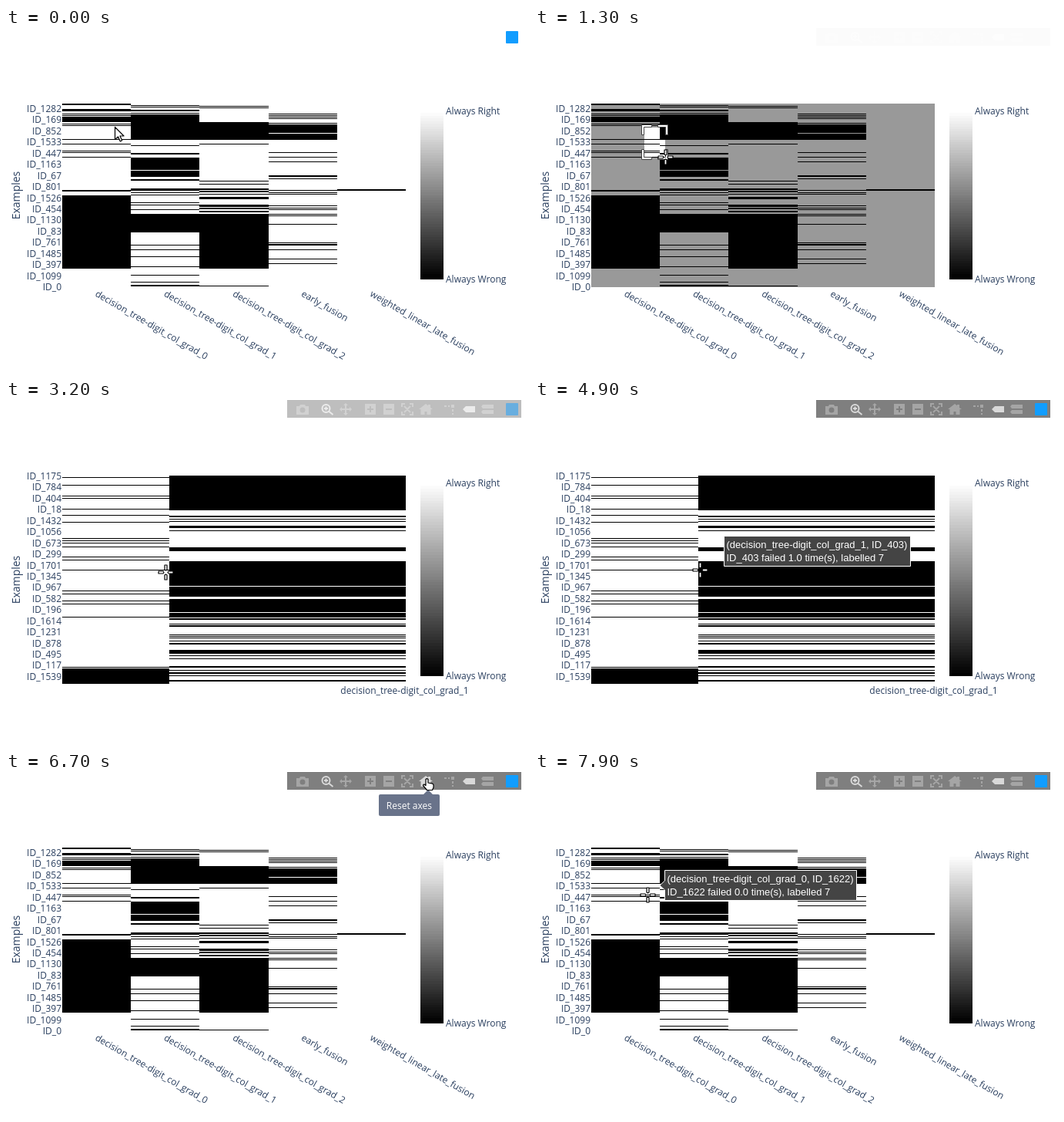
An HTML page for the animation above (8 s loop, 679x446 px).

```html
<!DOCTYPE html>
<html lang="en">
<head>
<meta charset="utf-8">
<title>Heatmap zoom</title>
<style>
html, body { margin: 0; width: 100%; height: 100%; overflow: hidden; background: #fff; }
svg { display: block; font: 12px "Open Sans", sans-serif; }
.axis { fill: #2a3f5f; }
.hover { font: 13px "Liberation Sans", Arial, sans-serif; fill: #fff; }
</style>
</head>
<body>
<svg id="stage" width="679" height="446" viewBox="0 0 679 446"></svg>
<script>
const LOOP = 8000, STEP = 100;
const stage = document.getElementById('stage');

function add(parent, tag, attrs = {}, text) {
  const el = document.createElementNS('http://www.w3.org/2000/svg', tag);
  set(el, attrs);
  if (text !== undefined) el.textContent = text;
  parent.appendChild(el);
  return el;
}
function set(el, attrs) {
  for (const k in attrs) el.setAttribute(k, attrs[k]);
}
const show = (el, on) => set(el, { visibility: on ? 'visible' : 'hidden' });
const group = (attrs) => add(stage, 'g', attrs);

// One heatmap column: single-pixel rows plus [top, bottom] bands.
function column(g, x0, x1, lines, bands) {
  const box = (a, b) => `M${x0} ${a}H${x1}V${b}H${x0}Z`;
  add(g, 'path', { d: lines.map(y => box(y, y + 1)).join('') + bands.map(b => box(...b)).join('') });
}

function axes(g, ids, firstY, pitch, titleY, barEnd) {
  ids.split(' ').forEach((id, i) => add(g, 'text',
    { class: 'axis', x: 72, y: firstY + i * pitch, 'text-anchor': 'end' }, 'ID_' + id));
  add(g, 'text', { class: 'axis', transform: `translate(18 ${titleY}) rotate(-90)`,
    'text-anchor': 'middle', 'font-size': 14 }, 'Examples');
  const n = 64, h = (barEnd - 107) / n;
  for (let i = 0; i < n; i++) {
    const v = Math.round(255 * (1 - i / (n - 1)));
    const top = Math.round(107 + i * h);
    add(g, 'rect', { x: 538, y: top, width: 30, height: Math.round(107 + (i + 1) * h) - top,
      fill: `rgb(${v},${v},${v})` });
  }
  add(g, 'text', { class: 'axis', x: 571, y: 112 }, 'Always Right');
  add(g, 'text', { class: 'axis', x: 571, y: barEnd + 4 }, 'Always Wrong');
}

// Full view
const full = group();
column(full, 73, 162, [111, 113, 124, 126, 144, 150, 159, 161, 167],
  [[98, 100], [105, 108], [115, 122], [210, 212], [217, 312]]);
column(full, 162, 251, [100, 102, 110, 152, 213, 216, 226, 229, 235, 281, 287, 296, 309, 320, 329],
  [[106, 108], [112, 145], [162, 164], [168, 184], [185, 193], [196, 198], [208, 211], [241, 265], [333, 335]]);
column(full, 251, 341, [101, 103, 150, 198, 202, 215, 334],
  [[122, 145], [208, 210], [211, 213], [219, 222], [229, 232], [233, 235], [237, 239], [241, 312]]);
column(full, 341, 430, [111, 113, 115, 117, 123, 161, 167, 173, 195, 210, 213, 215, 230, 233, 235, 241,
  243, 254, 278, 287, 299, 305], [[125, 136], [137, 145], [191, 193], [280, 282]]);
column(full, 430, 519, [], [[209, 211]]);
axes(full, '1282 169 852 1533 447 1163 67 801 1526 454 1130 83 761 1485 397 1099 0', 109, 14.44, 217, 326);
['decision_tree-digit_col_grad_0', 'decision_tree-digit_col_grad_1', 'decision_tree-digit_col_grad_2',
  'early_fusion', 'weighted_linear_late_fusion'].forEach((name, i) => add(full, 'text',
  { class: 'axis', transform: `translate(${115 + i * 89.2} 347) rotate(30)` }, name));

// Zoomed view
const zoomed = group();
column(zoomed, 73, 212, [100, 110, 124, 127, 141, 149, 158, 179, 182, 185, 190, 203, 207, 220, 247, 251,
  260, 264, 281, 346], [[348, 368]]);
column(zoomed, 212, 519, [154, 157, 169, 290, 304, 306, 308, 312, 331, 335, 350, 357],
  [[98, 143], [150, 152], [163, 166], [191, 196], [209, 241], [242, 255], [258, 275], [276, 282],
  [283, 285], [292, 294], [315, 317], [324, 329], [345, 347], [353, 355], [363, 365]]);
axes(zoomed, '1175 784 404 18 1432 1056 673 299 1701 1345 967 582 196 1614 1231 878 495 117 1539',
  103, 14.44, 233, 358);
add(zoomed, 'text', { class: 'axis', x: 517.5, y: 381, 'text-anchor': 'middle' }, 'decision_tree-digit_col_grad_1');

// Zoom box
const dim = add(stage, 'path', { 'fill-rule': 'evenodd' });
const corners = add(stage, 'path', { fill: '#fff', stroke: '#444' });

// Hover label
const label = group({ class: 'hover' });
const labelBox = add(label, 'path', { fill: '#444', stroke: '#fff' });
const labelRows = [add(label, 'text'), add(label, 'text')];

function drawLabel(x, y, col, id, fails, digit, centred) {
  labelRows[0].textContent = `(decision_tree-digit_col_grad_${col}, ID_${id})`;
  labelRows[1].textContent = `ID_${id} failed ${fails}.0 time(s), labelled ${digit}`;
  const w = Math.round(Math.max(...labelRows.map(r => r.getComputedTextLength())) + 7);
  const left = centred ? Math.round(x - w / 2) + 0.5 : x + 6.5;
  const tip = centred ? '' : `V${y + 6}L${x} ${y}L${left} ${y - 6}`;
  set(labelBox, { d: `M${left} ${y - 19.5}h${w}v39h${-w}${tip}Z` });
  labelRows.forEach((r, i) => set(r, { x: left + 3, y: y - 4 + i * 16.5 }));
}

// Toolbar
const bar = group();
add(bar, 'rect', { x: 365, width: 304, height: 23, fill: '#7f7f7f' });
function icon(fill, line = '', lit = false) {
  const g = add(bar, 'g', { opacity: lit ? 0.7 : 0.3 });
  add(g, 'path', { d: fill, fill: '#fff', 'fill-rule': 'evenodd' });
  add(g, 'path', { d: line, fill: 'none', stroke: '#fff', 'stroke-width': 2 });
  return g;
}
icon('M377 8h4l1-2h6l1 2h4v11h-16zM381.5 13a3.5 3.5 0 1 0 7 0a3.5 3.5 0 1 0-7 0z');
icon('', 'M410.5 11a5 5 0 1 0 10 0a5 5 0 1 0-10 0M413 11h5M415.5 8.5v5M419.5 15l5 4', true);
icon('M433 12l3-3v6zM449 12l-3-3v6zM441 4l-3 3h6zM441 20l-3-3h6z', 'M436 12h10M441 7v10');
icon('M466 5h14v14h-14zM472 8h2v3h3v2h-3v3h-2v-3h-3v-2h3z');
icon('M490 5h14v14h-14zM493 11h8v2h-8z');
const autoIcon = icon('', 'M514 9V5h4M524 5h4v4M528 15v4h-4M518 19h-4v-4M517 8l8 8M525 8l-8 8');
const homeIcon = icon('M536 12l9-7 3 2.3V6h3v4l3 2h-2.5v7h-5v-4h-3v4h-5v-7z');
icon('M578 6h4v4h-4zM569 7h3v2h-3zM574 7h2v2h-2zM579 12h2v3h-2zM579 17h2v2h-2z');
icon('M593 12l4-4h12v8h-12z', '', true);
icon('M617 8.5l2-2.5h14v5h-14zM617 15.5l2-2.5h14v5h-14z');
const badge = add(stage, 'rect', { x: 649, y: 4, width: 16, height: 16, rx: 1, fill: '#119dff' });

// Toolbar tip
const tip = group();
const tipBox = add(tip, 'rect', { y: 29, height: 28, rx: 2, fill: '#69738a' });
const tipNotch = add(tip, 'path', { fill: '#69738a' });
const tipText = add(tip, 'text', { y: 48, fill: '#fff', 'text-anchor': 'end' });
function drawTip(text, x) {
  tipText.textContent = text;
  const w = Math.round(tipText.getComputedTextLength() + 20);
  set(tipText, { x: x + 8 });
  set(tipBox, { x: x + 18 - w, width: w });
  set(tipNotch, { d: `M${x - 3} 29l6-6 6 6z` });
}

// Pointers, each drawn around its own origin
const shapes = {
  arrow: 'M0 0V16L4 12.5L6.8 18.5L9.2 17.3L6.5 11.5H11.5Z',
  cross: 'M-9.5-1.5h6l1 1.5-1 1.5h-6zM9.5-1.5h-6l-1 1.5 1 1.5h6zM-1.5-9.5v6l1.5 1 1.5-1v-6zM-1.5 9.5v-6l1.5-1 1.5 1v6z',
  hand: 'M-2.5-6q1.5-1.8 3 0v4.5l5 .8q2 .5 2 2.2v3l-1.5 3.5h-7l-5-6q0-2 2-1l1.5 1z'
};
const pointer = add(stage, 'path', { fill: '#fff', stroke: '#000', 'stroke-width': 1.2, 'stroke-linejoin': 'round' });

const path = [
  [0, 141, 128], [100, 141, 128], [200, 142, 138], [500, 142, 138], [600, 142, 130], [800, 145, 134],
  [2100, 207, 221], [2200, 207, 221], [2300, 207, 223], [4800, 207, 223], [4900, 214, 220],
  [5700, 524, 14], [5800, 540, 14], [5900, 547, 15], [6800, 547, 15], [6900, 460, 55], [7000, 355, 100],
  [7200, 147, 174], [7300, 147, 174], [7400, 143, 179], [7700, 143, 179], [7800, 145, 170], [7900, 146, 159]
];
const barFade = [[0, 0], [100, 0], [200, 1], [500, 1], [600, 0.8], [700, 0.35], [800, 0],
  [3100, 0.1], [3200, 0.5], [3300, 0.85], [3400, 1]];
const badgeFade = [[0, 1], [500, 1], [600, 0.8], [700, 0.35], [800, 0.05], [900, 0], [3000, 0],
  [3100, 0.1], [3200, 0.5], [3300, 0.85], [3400, 1]];
const dimFade = [[700, 0], [800, 0.063], [900, 0.25], [1000, 0.4]];
const labels = [
  [0], [4900, 365.5, 196, 1, 403, 1, 7, true], [5300],
  [7100, 341, 134, 2, 852, 1, 2], [7200, 251, 163, 1, 403, 1, 7],
  [7400, 162, 179, 0, 1163, 0, 3], [7800, 162, 165, 0, 447, 0, 3], [7900, 162, 147, 0, 1622, 0, 7]
];
const tips = [[0], [5700, 'Autoscale', 521], [5800, 'Reset axes', 545], [6900]];

const current = (table, t) => table.filter(row => row[0] <= t).pop().slice(1);
function tween(table, t) {
  const i = table.findIndex(row => row[0] > t);
  if (i < 0) return table[table.length - 1].slice(1);
  if (i === 0) return table[0].slice(1);
  const a = table[i - 1], b = table[i], f = (t - a[0]) / (b[0] - a[0]);
  return a.slice(1).map((v, k) => v + (b[k + 1] - v) * f);
}

function drawZoomBox(t, x, y) {
  const on = t >= 800 && t < 3100;
  show(dim, on);
  show(corners, on);
  if (!on) return;
  const l = 142, top = 129, r = Math.round(x), b = Math.round(y), open = r - l >= 8;
  set(dim, { d: 'M73 98H519V336H73Z' + (open ? `M${l} ${top}H${r}V${b}H${l}Z` : ''),
    'fill-opacity': tween(dimFade, t)[0] });
  const n = Math.floor(Math.min(b - top, r - l, 20) / 2);
  const corner = (cx, cy, sx, sy) =>
    `M${cx + 3.5 * sx} ${cy + sy * (0.5 - n)}h${-3 * sx}v${n * sy}h${-n * sx}v${3 * sy}h${(n + 3) * sx}z`;
  set(corners, { d: open ? corner(l, top, -1, -1) + corner(r, top, 1, -1) + corner(r, b, 1, 1) + corner(l, b, -1, 1) : '' });
}

function draw(t) {
  const [x, y] = tween(path, t);
  const isZoomed = t >= 3100 && t < 6700;
  show(full, !isZoomed);
  show(zoomed, isZoomed);
  drawZoomBox(t, x, y);

  const hover = current(labels, t);
  show(label, hover.length);
  if (hover.length) drawLabel(...hover);

  set(bar, { opacity: tween(barFade, t)[0] });
  set(badge, { opacity: tween(badgeFade, t)[0] });
  const hint = current(tips, t);
  show(tip, hint.length);
  if (hint.length) drawTip(...hint);
  set(autoIcon, { opacity: hint[1] === 521 ? 0.7 : 0.3 });
  set(homeIcon, { opacity: hint[1] === 545 ? 0.7 : 0.3 });

  const kind = y < 23 && x > 365 ? 'hand' : t < 200 || y < 98 ? 'arrow' : 'cross';
  set(pointer, { d: shapes[kind], transform: `translate(${Math.round(x) + 0.5} ${Math.round(y) + 0.5})` });
}

const start = performance.now();
function tick() {
  const t = (performance.now() - start) % LOOP;
  draw(Math.floor(t / STEP) * STEP);
  requestAnimationFrame(tick);
}
tick();
</script>
</body>
</html>
```
